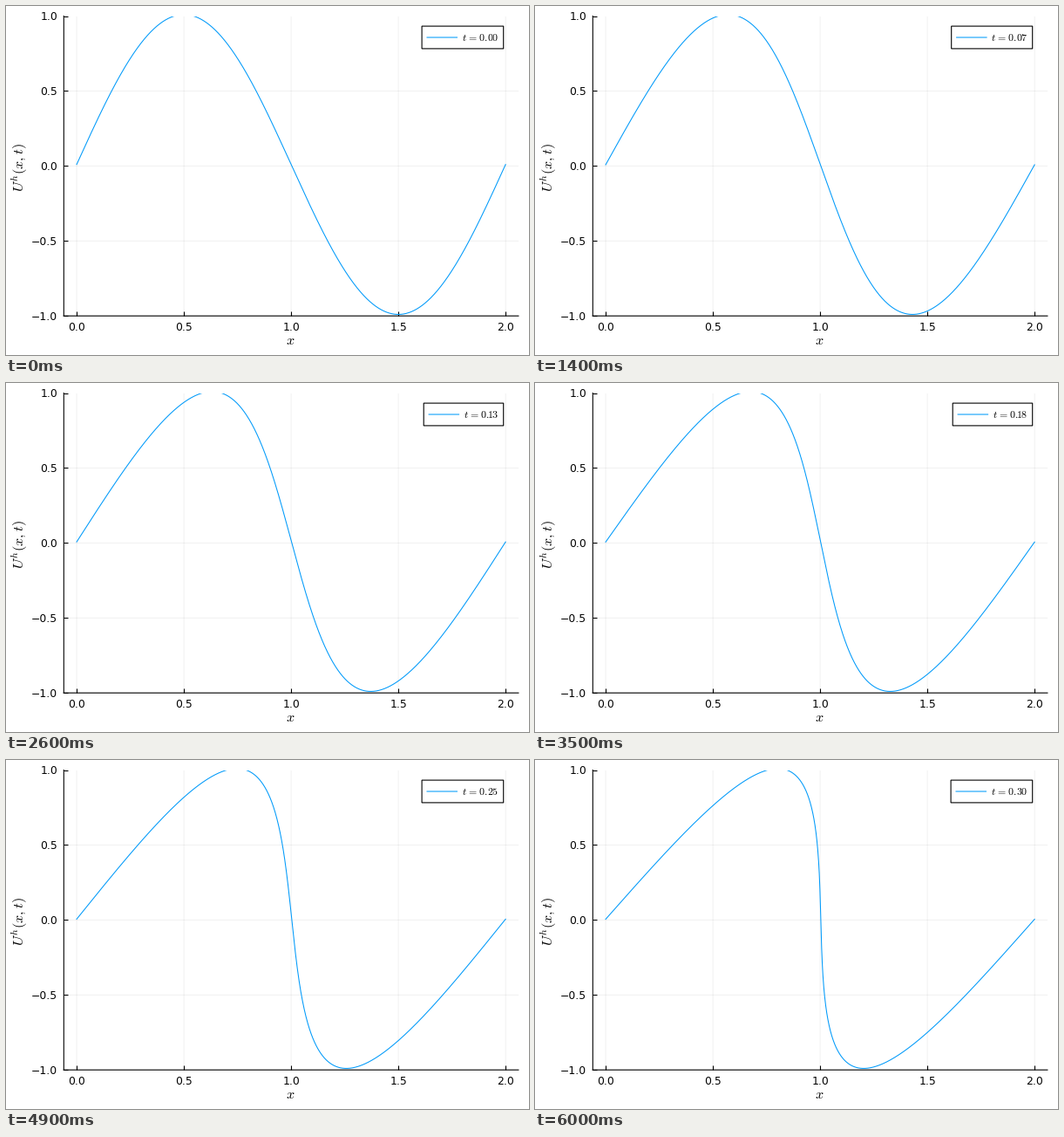
Write a matplotlib script that moves like this. It is 600 px wide and 400 px high and loops after 6200 ms.

```python
import matplotlib.pyplot as plt
import numpy as np
from matplotlib.animation import FuncAnimation
from matplotlib.patches import Rectangle

W, H, DPI = 600, 400, 100
PX = 72 / DPI                 # points per pixel
BLUE = "#009afa"
STEPS, DT = 60, 0.005
TICK, LEGEND, LABEL = 12.4 * PX, 11.9 * PX, 16.2 * PX
THIN = 1.05 * PX

plt.rcParams.update({"font.family": "DejaVu Sans", "mathtext.fontset": "cm",
                     "path.snap": False})

fig = plt.figure(figsize=(W / DPI, H / DPI), dpi=DPI, facecolor="white")

# Plot area
left, right, top, bottom = 66.3, 587.9, 11.5, 355.2
ax = fig.add_axes([left / W, 1 - bottom / H, (right - left) / W, (bottom - top) / H])
ax.set(xlim=(-0.06, 2.06), ylim=(-1, 1),
       xticks=np.arange(0, 2.1, 0.5), yticks=np.arange(-1, 1.1, 0.5))
ax.spines[["top", "right"]].set_visible(False)
ax.spines[["left", "bottom"]].set_linewidth(1.1 * PX)
ax.tick_params(direction="in", length=5 * PX, width=1.1 * PX, labelsize=TICK)
ax.tick_params(axis="x", pad=6.5 * PX)
ax.tick_params(axis="y", pad=7 * PX)
ax.grid(color="black", alpha=0.06, linewidth=PX)
ax.set_axisbelow(True)
curve, = ax.plot([], [], color=BLUE, lw=THIN)

# Overlay in pixel coordinates for the labels and the legend
over = fig.add_axes([0, 0, 1, 1])
over.set(xlim=(0, W), ylim=(H, 0))
over.axis("off")
over.text(326.5, 388, "$x$", size=LABEL, ha="center", va="baseline")
over.text(20.6, 184.8, "$U^h(x,t)$", size=LABEL, rotation=90,
          rotation_mode="anchor", ha="center", va="baseline")

BOX_LEFT, BOX_RIGHT, BOX_TOP, BOX_BOTTOM = 477.1, 570.7, 23.1, 48.9
box = over.add_patch(Rectangle((BOX_LEFT, BOX_TOP), 1, BOX_BOTTOM - BOX_TOP,
                               fc="white", ec="black", lw=1.1 * PX))
key, = over.plot([], [], color=BLUE, lw=THIN, solid_capstyle="butt")
label = over.text(565, 40, "", size=LEGEND, ha="right", va="baseline")

TRIM = {"1": 2.1, "7": 0.6}   # pixels saved by narrow digits
SPACE = 10.45                 # pixels in one unit of \hspace

x = np.linspace(0, 2, 2001)
start = np.linspace(-0.5, 2.5, 6001)
speed = 0.01 + np.sin(np.pi * start)


def wave(t):
    """Inviscid Burgers solution, carried along its characteristics."""
    return np.interp(x, start + speed * t, speed)


def hspace(amount):
    return rf"\hspace{{{amount:.3f}}}"


def glyph(digit):
    side = hspace(-TRIM.get(digit, 0) / 2 / SPACE)
    return side + digit + side


def set_legend(hundredths):
    digits = f"{hundredths:02d}"
    shrink = sum(TRIM.get(d, 0) for d in digits)
    wide = hspace(0.1)
    # The negative space cancels the gap mathtext adds after the point
    number = "0." + hspace(-0.2) + "".join(map(glyph, digits))
    label.set_text(f"$t{wide}={wide}{number}$")
    box.set_x(BOX_LEFT + shrink)
    box.set_width(BOX_RIGHT - BOX_LEFT - shrink)
    key.set_data([482.5 + shrink, 518 + shrink], [36, 36])


def draw(i):
    step = min(i, STEPS)
    curve.set_data(x, wave(step * DT))
    set_legend((step + 1) // 2)
    return curve, box, key, label


anim = FuncAnimation(fig, draw, frames=STEPS + 2, interval=100,
                     repeat=True, repeat_delay=0, blit=False)
plt.show()
```
